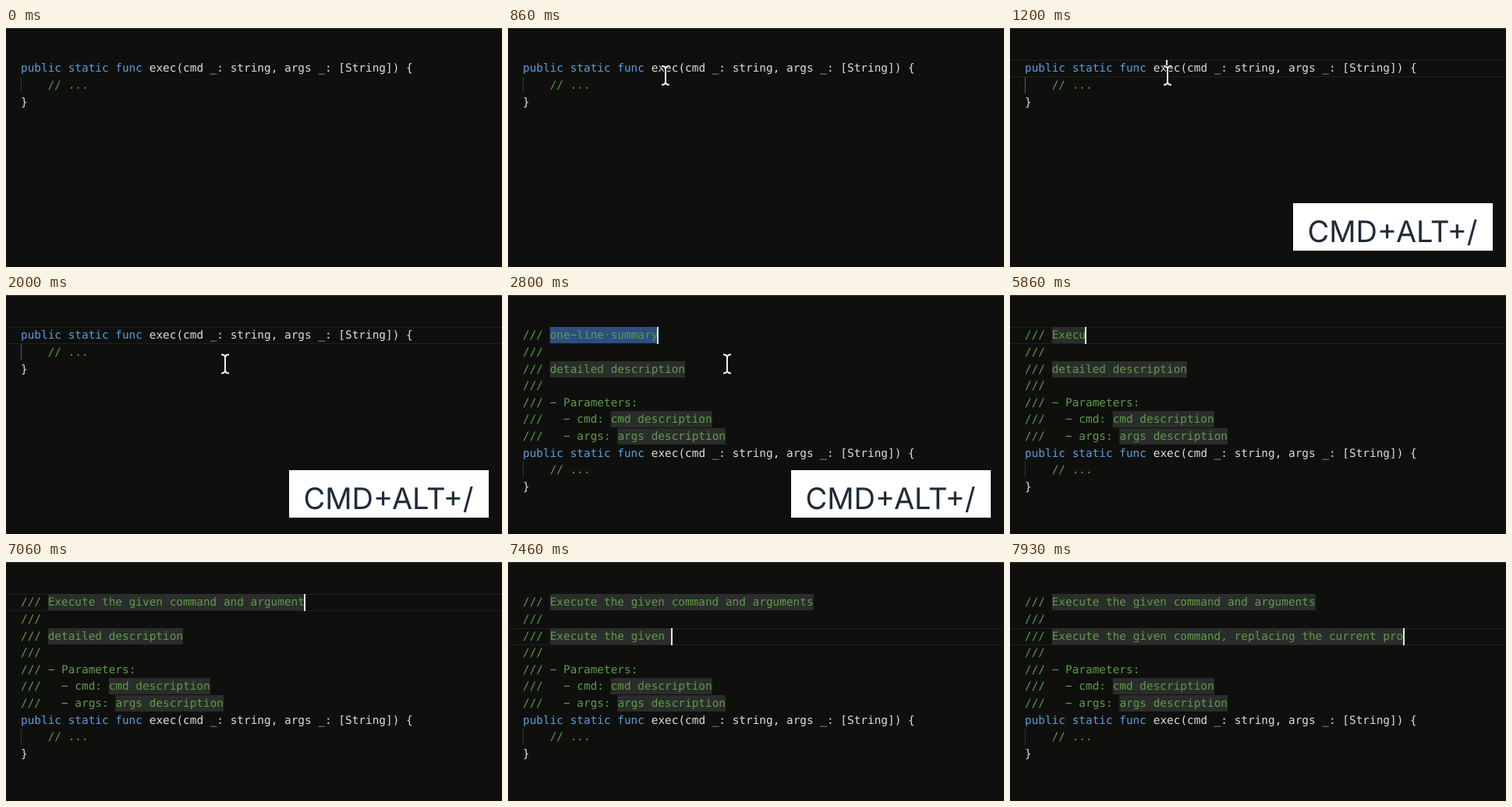
Recreate the animation shown at these times as an HTML page with a canvas. Size 636x307 px, loop 8 s.

```html
<!DOCTYPE html>
<html lang="en">
<head>
<meta charset="utf-8">
<title>Doc comment snippet</title>
<style>
  html, body { margin: 0; width: 100%; height: 100%; overflow: hidden; background: #0f100e; }
  canvas { display: block; }
</style>
</head>
<body>
<canvas width="636" height="307"></canvas>
<script>
const ctx = document.querySelector("canvas").getContext("2d");
const LOOP = 8000, TICKS_PER_SECOND = 15;
const LEFT = 19, TOP = 41.3, ADVANCE = 8.67, LINE = 21.6;
const COLOR = {
  back: "#0f100e", edge: "#383938", text: "#dcdddc", keyword: "#5b9cdc", comment: "#5f9a4a",
  field: "#2a2d2b", selection: "#2d4f80", rule: "#20211f", guide: "#343534", activeGuide: "#5a5b5a",
  caret: "#e6e6e6", badge: "#ffffff", badgeText: "#1e2b38"
};

// Moments of the story, in ticks of 1/15 s
const ENTER = 1, ARRIVE = 13, BADGE_ON = 15, CLICK = 18, LEAVE = 22, REST = 26,
      INSERT = 42, BADGE_OFF = 72, NEXT_FIELD = 108;
const KEYS = [73, 77, 81, 84, 88, 90, 93];
const SUMMARY = "Execute the given command and arguments";
const DETAIL = "Execute the given command, replacing the current pro";

const colX = col => LEFT + col * ADVANCE;
const rowY = row => TOP + row * LINE;
const clamp = v => Math.min(1, Math.max(0, v));
const ease = v => v * v * (3 - 2 * v);
const mix = (a, b, u) => a + (b - a) * u;

function rect(x, y, w, h, color) {
  ctx.fillStyle = color;
  ctx.fillRect(x, y, w, h);
}

function write(row, col, text, color) {
  ctx.fillStyle = color;
  ctx.fillText(text.replaceAll("-", "\u2212"), colX(col), Math.round(rowY(row) + 15));
}

function field(row, col, text, selected) {
  const x = colX(col), y = Math.round(rowY(row));
  rect(x, y, text.length * ADVANCE, 21, selected ? COLOR.selection : COLOR.field);
  if (selected) write(row, col + text.indexOf(" "), "·", "#53729a");
  write(row, col, text, COLOR.comment);
}

function lineHighlight(row) {
  const y = Math.round(rowY(row));
  rect(0, y, 636, 1, COLOR.rule);
  rect(0, y + 21, 636, 1, COLOR.rule);
}

function caret(row, col) {
  rect(Math.round(colX(col)) - 1, Math.round(rowY(row)), 2, 22, COLOR.caret);
}

function code(row, active) {
  write(row, 0, "public static func", COLOR.keyword);
  write(row, 19, "exec(cmd _: string, args _: [String]) {", COLOR.text);
  rect(LEFT, Math.round(rowY(row + 1)), 1, 21, active ? COLOR.activeGuide : COLOR.guide);
  write(row + 1, 4, "// ...", COLOR.comment);
  write(row + 2, 0, "}", COLOR.text);
}

function summaryLength(n) {
  if (n > 106) return SUMMARY.length;
  if (n > 97) return Math.round(mix(7, 38, (n - 97) / 9));
  return KEYS.filter(key => key <= n).length;
}

function detailLength(n) {
  if (n <= NEXT_FIELD) return 0;
  return n === 109 ? 3 : Math.round(mix(8, DETAIL.length, (n - 110) / 9));
}

function docComment(n) {
  const summary = SUMMARY.slice(0, summaryLength(n));
  const detail = DETAIL.slice(0, detailLength(n));
  const row = n < NEXT_FIELD ? 0 : 2;
  if (row ? detail : summary) lineHighlight(row * 1);
  for (let i = 0; i < 7; i++) write(i, 0, "///", COLOR.comment);
  field(0, 4, summary || "one-line summary", !summary);
  field(2, 4, detail || "detailed description", row === 2 && !detail);
  write(4, 4, "- Parameters:", COLOR.comment);
  ["cmd", "args"].forEach((name, i) => {
    write(5 + i, 6, `- ${name}:`, COLOR.comment);
    field(5 + i, 9 + name.length + 1, `${name} description`, false);
  });
  code(7, false);
  const blinkOn = n >= KEYS[0] || (n - INSERT) % 15 < 7;
  const width = row ? (detail || "detailed description").length : (summary || "one-line summary").length;
  if (blinkOn) caret(row, 4 + width);
}

function pointer(n) {
  let x, y;
  if (n < LEAVE) {
    const u = ease(clamp((n - ENTER + 1) / (ARRIVE - ENTER + 1)));
    const curve = (a, b, c) => mix(mix(a, b, u), mix(b, c, u), u);
    x = curve(548, 340, 202);
    y = curve(83, 42, 61);
  } else {
    const u = ease(clamp((n - LEAVE + 1) / (REST - LEAVE + 1)));
    x = mix(202, 281, u);
    y = mix(61, 88.5, u);
  }
  const beam = new Path2D("M-5 -12Q0 -12 0 -8Q0 -12 5 -12M0 -8V8M-5 12Q0 12 0 8Q0 12 5 12");
  ctx.save();
  ctx.translate(x, y);
  ctx.strokeStyle = COLOR.back;
  ctx.lineWidth = 4;
  ctx.stroke(beam);
  ctx.strokeStyle = "#f0f0f0";
  ctx.lineWidth = 2;
  ctx.stroke(beam);
  ctx.restore();
}

function badge() {
  rect(363, 225, 256, 61, COLOR.badge);
  ctx.save();
  ctx.font = "38px Inter, sans-serif";
  ctx.textAlign = "center";
  ctx.fillStyle = COLOR.badgeText;
  ctx.fillText("CMD+ALT+/", 490.5, 275);
  ctx.restore();
}

function draw(ms) {
  const n = Math.floor((ms + 7) * TICKS_PER_SECOND / 1000);
  rect(0, 0, 636, 307, COLOR.back);
  rect(0, 0, 636, 1, COLOR.edge);
  ctx.font = '14.4px "DejaVu Sans Mono", monospace';
  ctx.textRendering = "geometricPrecision";

  if (n < INSERT) {
    const clicked = n >= CLICK;
    if (clicked) lineHighlight(0);
    code(0, clicked);
    if (clicked && (n - CLICK) % 15 < 7) caret(0, 21);
  } else {
    docComment(n);
  }
  if (n >= ENTER && n < BADGE_OFF) pointer(n);
  if (n >= BADGE_ON && n < BADGE_OFF) badge();
}

const start = performance.now();
function frame() {
  draw((performance.now() - start) % LOOP);
  requestAnimationFrame(frame);
}
frame();
</script>
</body>
</html>
```
